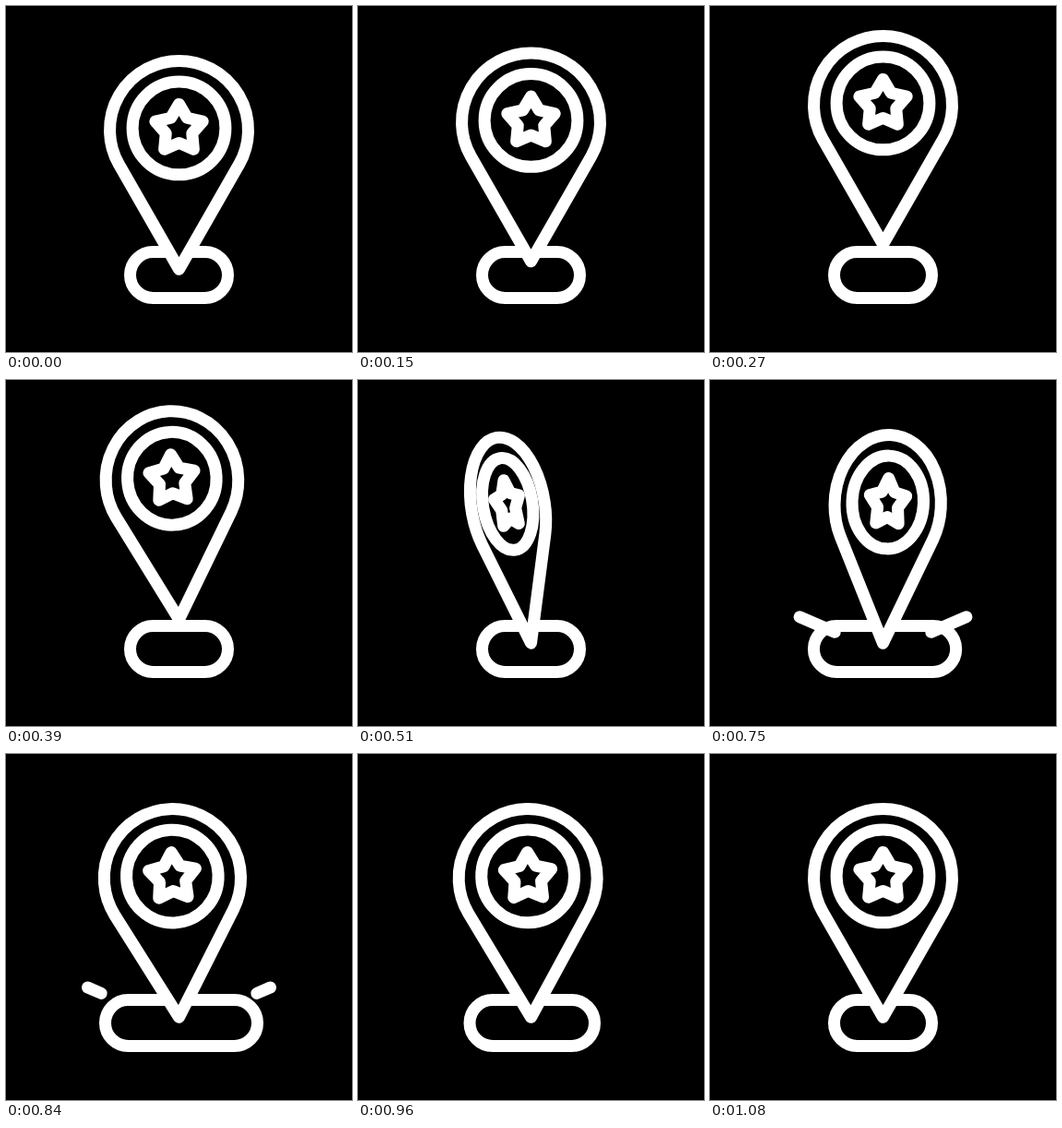
Animation, 375 px wide and 375 px high, one loop 1260 ms. Source, as an HTML page:

```html
<!DOCTYPE html>
<html lang="en">
<head>
<meta charset="utf-8">
<title>Map pin</title>
<style>
  html, body { margin: 0; width: 100%; height: 100%; overflow: hidden; background: #000; }
  svg { display: block; width: 100%; height: 100%; }
  svg * { vector-effect: non-scaling-stroke; }
</style>
</head>
<body>
<svg viewBox="0 0 375 375" fill="none" stroke="#fff" stroke-width="13" stroke-linecap="round" stroke-linejoin="round">
  <rect id="base" y="266.5" height="50" rx="25"/>
  <path id="rayLeft"/>
  <path id="rayRight"/>
  <!-- The pin's own origin is its tip. -->
  <g id="pin">
    <path d="M0 0L-65.3 -114A75 75 0 1 1 65.3 -114Z" fill="#000"/>
    <circle cy="-152.9" r="50.4"/>
    <path id="star"/>
  </g>
</svg>
<script>
const LOOP = 1260, STEP = 30, CENTER = 187.5;
const el = id => document.getElementById(id);

const progress = (t, from, to) => Math.min(1, Math.max(0, (t - from) / (to - from)));
const ease = p => (1 - Math.cos(Math.PI * p)) / 2;

// Eased value through [time, value] keys.
function track(t, keys) {
  const next = keys.findIndex(([time]) => time > t);
  if (next === 0) return keys[0][1];
  if (next < 0) return keys[keys.length - 1][1];
  const [t0, v0] = keys[next - 1], [t1, v1] = keys[next];
  return v0 + (v1 - v0) * ease(progress(t, t0, t1));
}

const LIFT = [[60, 0], [305, -28.4], [360, -28.4], [515, 0]];
const TILT = [[340, 0], [485, -10.8], [640, 9.7], [830, -2.7], [1080, 0]];
const FLIP = [[341, 1], [866, -1]];
const SPREAD = [[520, 0], [840, 1], [1080, 0]];
const RAY_HEAD = [[510, 0], [820, 1]];
const RAY_TAIL = [[630, 0], [930, 1]];

function starPath(cy, outer, inner) {
  const points = Array.from({ length: 10 }, (_, i) => {
    const r = i % 2 ? inner : outer, a = i * Math.PI / 5;
    return `${r * Math.sin(a)} ${cy - r * Math.cos(a)}`;
  });
  return `M${points.join("L")}Z`;
}

function drawRay(ray, side, tail, head) {
  const point = p => `${CENTER + side * (27.5 + 71.5 * p)} ${284 - 31 * p}`;
  ray.setAttribute("d", `M${point(tail)}L${point(head)}`);
  ray.setAttribute("visibility", head - tail > 0.005 ? "visible" : "hidden");
}

function render(t) {
  const flip = track(t, FLIP);
  const scale = Math.max(0.001, Math.abs(flip));
  el("pin").setAttribute("transform",
    `translate(${CENTER} ${285.3 + track(t, LIFT)}) rotate(${track(t, TILT)}) scale(${scale} 1)`);

  const spread = track(t, SPREAD);
  el("base").setAttribute("x", 134.5 - 27 * spread);
  el("base").setAttribute("width", 106 + 59 * spread);

  const tail = track(t, RAY_TAIL), head = track(t, RAY_HEAD);
  drawRay(el("rayLeft"), -1, tail, head);
  drawRay(el("rayRight"), 1, tail, head);
}

el("star").setAttribute("d", starPath(-151.9, 27, 15));

const start = performance.now();
function tick() {
  const t = (performance.now() - start) % LOOP;
  render(Math.floor(t / STEP) * STEP);
  requestAnimationFrame(tick);
}
tick();
</script>
</body>
</html>
```
